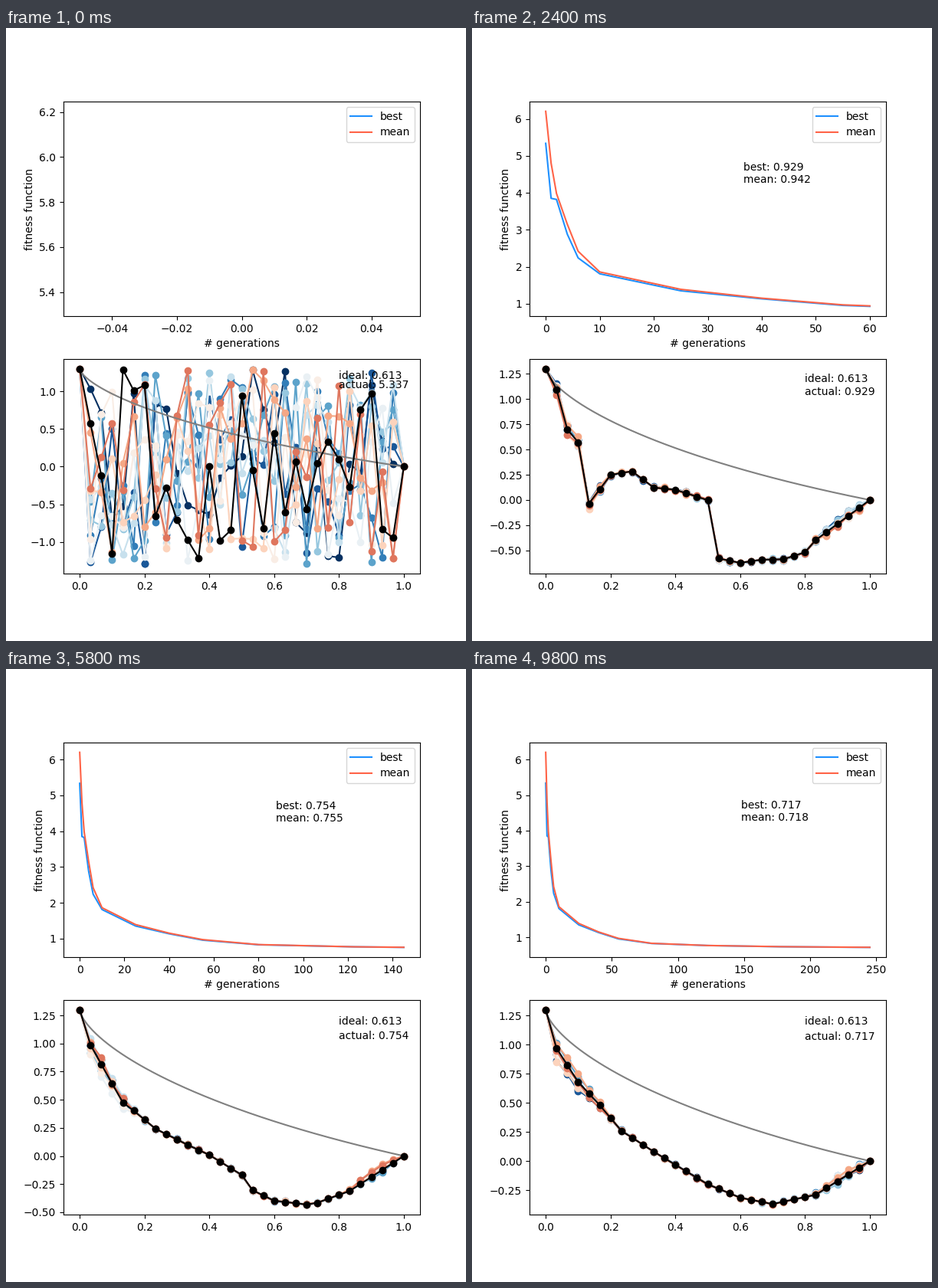
These frames come from a looping animation (600x800 px, 10 s). A matplotlib script:

```python
import numpy as np
import matplotlib.pyplot as plt
from matplotlib.animation import FuncAnimation

FRAMES, INTERVAL, STEP = 50, 200, 5
HEIGHT, POINTS, MEMBERS = 1.3, 31, 11

# Generation, best and mean time, joined by straight lines
HISTORY = [(0, 5.3365, 6.203), (1, 3.85, 4.80), (2, 3.82, 3.98),
           (4, 2.88, 3.15), (6, 2.24, 2.42), (10, 1.81, 1.86),
           (25, 1.35, 1.39), (40, 1.133, 1.150), (55, .955, .97),
           (80, .826, .831), (120, .770, .771), (170, .737, .739),
           (210, .724, .726), (245, .717, .718)]

# Corners of the best path (point number, height) at three stages
STEPPED = [(0, HEIGHT), (1, 1.16), (2, .61), (3, .595), (4, -.28), (6, .29),
           (8, .385), (10, .10), (15, .085), (16, -.69), (20, -.59),
           (24, -.60), (25, -.43), (30, 0)]
SETTLED = [(0, HEIGHT), (1, 1.03), (3, .55), (4, .21), (7, .20), (12, .11),
           (15, -.09), (16, -.47), (18, -.605), (22, -.58), (30, 0)]
SMOOTH = [(0, HEIGHT), (1, .97), (3, .68), (5, .48), (7, .26), (10, .08),
          (15, -.20), (18, -.315), (21, -.37), (25, -.29), (30, 0)]

index = np.arange(POINTS)
xs = index / (POINTS - 1)
gens = np.arange(STEP * (FRAMES - 1) + 1)
known, best_known, mean_known = np.array(HISTORY).T
best = np.interp(gens, known, best_known)
mean = np.interp(gens, known, mean_known)

first = np.random.default_rng(7).uniform(-HEIGHT, HEIGHT,
                                         (MEMBERS + 1, POINTS))
first[:, 0], first[:, -1] = HEIGHT, 0


def corners(points):
    return np.interp(index, *np.array(points).T)


stepped, settled, smooth = map(corners, (STEPPED, SETTLED, SMOOTH))


def blend(a, b, w):
    return a + (b - a) * w


def best_path(g):
    if g < 40:
        left = (best[g] - best[40]) / (best[0] - best[40])
        return blend(stepped, first[-1], left ** .8)
    if g < 80:
        return blend(stepped, settled, (g - 40) / 40)
    ease = (1 - np.exp(-(g - 80) / 58)) / (1 - np.exp(-165 / 58))
    return blend(settled, smooth, ease)


def bump(center, width):
    return np.exp(-((index - center) / width) ** 2)


def population(g, lead):
    if g == 0:
        return first[:-1]
    rng = np.random.default_rng(21 + g)
    noise = rng.uniform(-1, 1, (MEMBERS, POINTS))
    lean = rng.uniform(-1, 1, (2, MEMBERS, 1))
    age = min(g / 120, 1)
    loose = rng.random(noise.shape) < .4
    middle = (.03 - .022 * age + .8 * np.exp(-g / 5)) * loose * noise
    start, end = .7 * lean + .3 * noise
    spread = (middle + (.03 + .10 * age) * bump(2, 2.6) * start
              + .06 * bump(27.5, 2) * end)
    spread[:, [0, -1]] = 0
    return np.clip(lead + spread, lead.min() - .01, HEIGHT)


def cycloid():
    # Scale the curve so that it ends at (1, 0)
    t = np.linspace(1, 3, 20001)
    ratio = (t - np.sin(t)) / (1 - np.cos(t))
    end = np.interp(1 / HEIGHT, ratio, t)
    a = 1 / (end - np.sin(end))
    th = np.linspace(0, end, 200)
    return a * (th - np.sin(th)), HEIGHT - a * (1 - np.cos(th))


fig, (top, low) = plt.subplots(2, 1, figsize=(6, 8), dpi=100)
best_line, = top.plot([], [], color="dodgerblue", label="best")
mean_line, = top.plot([], [], color="tomato", label="mean")
top.set_xlabel("# generations")
top.set_ylabel("fitness function")
top.legend(loc="upper right")
score = top.text(0, .8 * best[0], "")

shades = plt.get_cmap("RdBu_r")(np.arange(MEMBERS) / 13)
paths = [low.plot(xs, xs, "o-", color=c)[0] for c in shades]
low.plot(*cycloid(), color="gray")
lead_line, = low.plot(xs, xs, "o-", color="black")
low.text(.8, .9 * HEIGHT, "ideal: 0.613")
actual = low.text(.8, .8 * HEIGHT, "")


def update(k):
    g = k * STEP
    best_line.set_data(gens[:g + 1], best[:g + 1])
    mean_line.set_data(gens[:g + 1], mean[:g + 1])
    score.set_x(.6 * (g + 1))
    score.set_text(f"best: {best[g]:.3f}\nmean: {mean[g]:.3f}")

    lead = best_path(g)
    for line, path in zip(paths, population(g, lead)):
        line.set_ydata(path)
    lead_line.set_ydata(lead)
    actual.set_text(f"actual: {best[g]:.3f}")
    for ax in (top, low):
        ax.relim()
        ax.autoscale_view()
    return []


anim = FuncAnimation(fig, update, frames=FRAMES, init_func=lambda: update(0),
                     interval=INTERVAL, repeat=True, repeat_delay=0)
plt.show()
```
